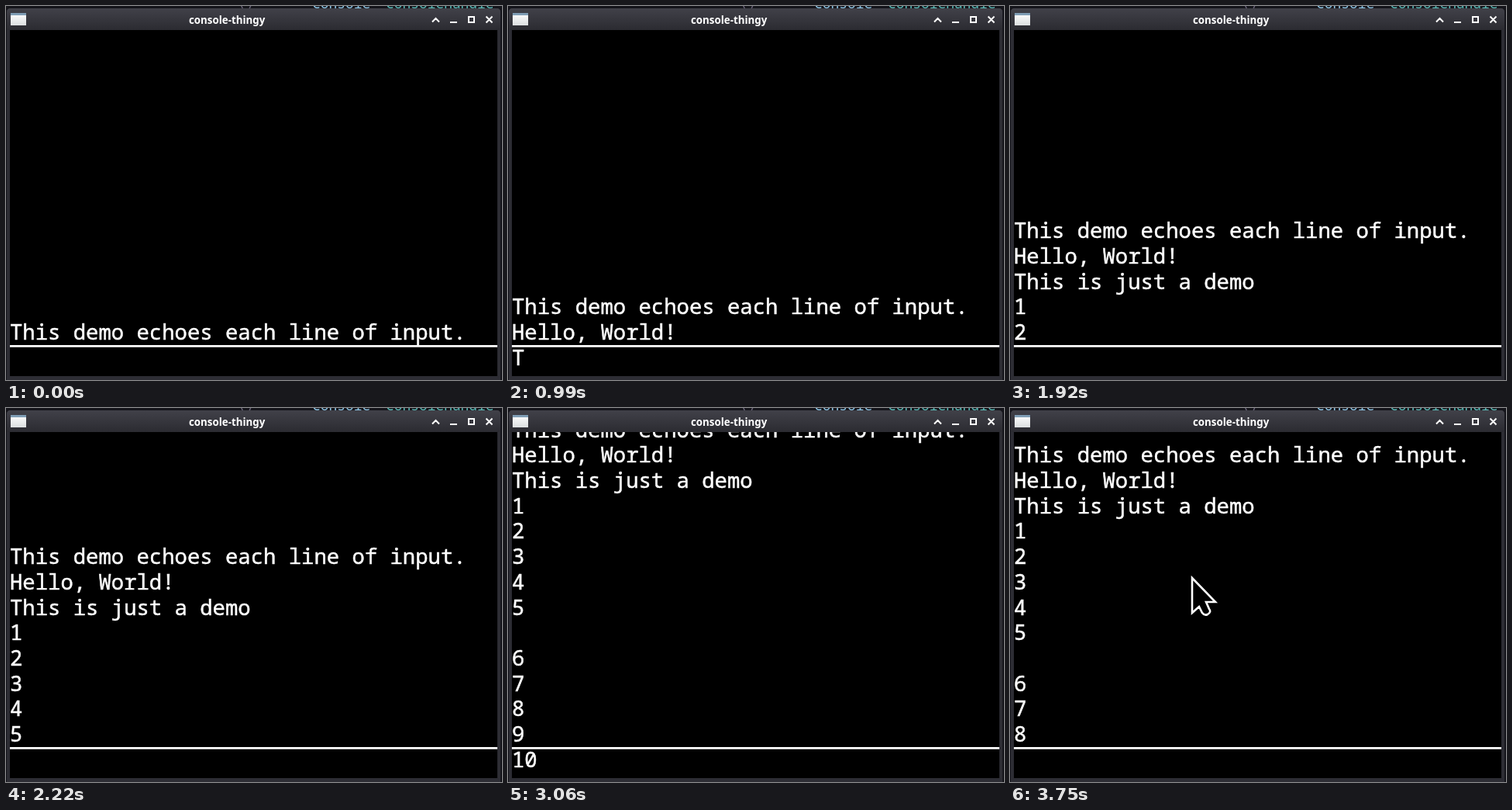
An HTML page for the animation above (4020 ms loop, 640 by 482 pixels).

```html
<!DOCTYPE html>
<html lang="en">
<head>
<meta charset="utf-8">
<title>console-thingy</title>
<style>
  html, body { margin: 0; width: 100%; height: 100%; overflow: hidden; background: #14141a; }
  svg { display: block; width: 100%; height: 100%; }
  .mono {
    font: 27.25px "Noto Sans Mono", "DejaVu Sans Mono", monospace;
    fill: #fff; stroke: #fff; stroke-width: .5px;
  }
  .title { font: bold 13.33px "Noto Sans", "Open Sans", sans-serif; fill: #fff; }
  .behind { font: 17.9px "Noto Sans Mono", monospace; }
</style>
</head>
<body>
<svg viewBox="0 0 640 482">
  <defs>
    <linearGradient id="bar" x2="0" y2="1">
      <stop offset="0" stop-color="#414149"/>
      <stop offset="1" stop-color="#2b2b31"/>
    </linearGradient>
    <linearGradient id="page" x2="0" y2="1">
      <stop offset="0" stop-color="#fff"/>
      <stop offset="1" stop-color="#dcdfe0"/>
    </linearGradient>
    <clipPath id="screen"><rect x="5" y="31" width="629" height="446"/></clipPath>
  </defs>

  <rect width="640" height="482" fill="#14141a"/>
  <g class="behind">
    <text x="299" y="1" fill="#6a6478">()</text>
    <text x="395" y="3" fill="#8cc4e4">Console</text>
    <text x="490" y="3" fill="#58b8b4">ConsoleHandle</text>
  </g>

  <path d="M1 482V8Q1 3 6 3H633Q638 3 638 8V482Z" fill="#2d2d34"/>
  <path d="M1 31V8Q1 3 6 3H633Q638 3 638 8V31Z" fill="url(#bar)"/>
  <rect x="6" y="9" width="20" height="16" fill="url(#page)"/>
  <rect x="6" y="9" width="20" height="3" fill="#7f9db5"/>
  <text class="title" x="236" y="22.5">console-thingy</text>
  <g fill="none" stroke="#fff" stroke-width="2">
    <path d="M550 20.5L554.5 16L559 20.5M573 21H582M619.5 13.5L627.5 21.5M627.5 13.5L619.5 21.5"/>
    <rect x="597" y="14" width="7" height="7"/>
  </g>

  <rect x="5" y="31" width="629" height="446" fill="#000"/>
  <g clip-path="url(#screen)">
    <g id="rows" class="mono"></g>
    <text id="input" class="mono" x="5" y="463"></text>
    <rect x="5" y="437" width="629" height="2.7" fill="#fff"/>
    <path id="pointer" d="M1 2V47L10 39L14 47Q17 51 21 49Q26 46 23 42L19 33H31Z"
      fill="#000" stroke="#fff" stroke-width="2.6"/>
  </g>
</svg>
<script>
  const LOOP = 4020, PITCH = 32.7, LAST_BASELINE = 430;
  const GREETING = "This demo echoes each line of input.";

  // Each entry: text, time of first key, time of last key, time of Enter
  const entries = [
    ["Hello, World!", 30, 495, 690],
    ["This is just a demo", 990, 1460, 1500],
    ...[1, 2, 3, 4, 5].map((n, i) => shortEntry(n, 1770 + i * 100, 50)),
    ["", 2310, 2310, 2310],
    ...[6, 7, 8, 9].map((n, i) => shortEntry(n, 2370 + i * 128, 64)),
    ["10", 3000, 3060, 3120]
  ];

  function shortEntry(n, start, delay) {
    return [String(n), start, start, start + delay];
  }

  const rowsGroup = document.getElementById("rows");
  const input = document.getElementById("input");
  const pointer = document.getElementById("pointer");

  const rows = [GREETING, ...entries.map(e => e[0])].map(text => {
    const row = document.createElementNS("http://www.w3.org/2000/svg", "text");
    row.textContent = text;
    row.setAttribute("x", 5);
    return rowsGroup.appendChild(row);
  });

  function typed([text, first, last], t) {
    if (t < first) return "";
    const pace = (last - first) / Math.max(1, text.length - 1);
    return text.slice(0, pace ? 1 + Math.floor((t - first) / pace + 1e-6) : 1);
  }

  function render(t) {
    const entered = entries.filter(e => t >= e[3]).length;
    const scrolled = (t >= 3540) + (t >= 3630);
    const bottom = entered - scrolled;
    rows.forEach((row, i) => {
      row.setAttribute("visibility", i <= bottom ? "visible" : "hidden");
      row.setAttribute("y", LAST_BASELINE - (bottom - i) * PITCH);
    });
    input.textContent = entered < entries.length ? typed(entries[entered], t) : "";

    const p = Math.min(1, Math.max(0, (t - 3180) / 270));
    const away = (1 - p) ** 2;
    pointer.setAttribute("visibility", p > 0 ? "visible" : "hidden");
    pointer.setAttribute("transform", `translate(${234 + 90 * away} ${217 + 260 * away})`);
  }

  const start = performance.now();
  function tick() {
    const t = (performance.now() - start) % LOOP;
    render(Math.floor(t / 30) * 30);
    requestAnimationFrame(tick);
  }
  tick();
</script>
</body>
</html>
```
